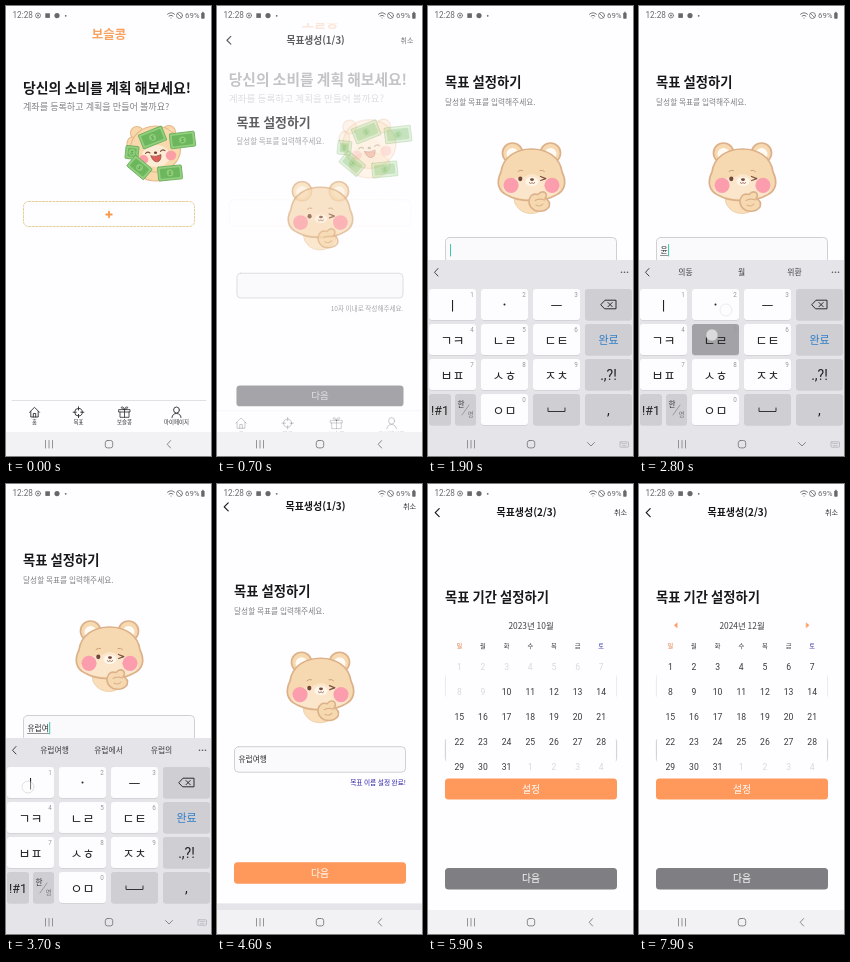
An HTML page with a canvas for the animation above (8 s loop, 205 px wide and 450 px high).

```html
<!DOCTYPE html>
<html lang="ko">
<head>
<meta charset="utf-8">
<style>
html, body { margin: 0; width: 100%; height: 100%; overflow: hidden; background: #fefdff; }
canvas { display: block; width: 205px; height: 450px; }
</style>
</head>
<body>
<canvas id="stage"></canvas>
<script>
const W = 205, H = 450, LOOP = 8000;
const KR = '"Noto Sans CJK KR", "Noto Sans CJK JP", "Noto Sans CJK SC", sans-serif';
const LATIN = 'Roboto, "Noto Sans CJK KR", sans-serif';
const BG = '#fefdff', ORANGE = '#ff985b', GRAY = '#7f7e82', INK = '#18181a', MUTED = '#818085';
const canvas = document.getElementById('stage');
const c = canvas.getContext('2d');
const ratio = Math.max(1, window.devicePixelRatio || 1);
canvas.width = W * ratio;
canvas.height = H * ratio;

const clamp = (v, a = 0, b = 1) => Math.min(b, Math.max(a, v));
const span = (t, from, to) => clamp((t - from) / (to - from));
const easeOut = u => 1 - (1 - u) * (1 - u);

// y is the vertical middle of the text
function text(s, x, y, size, color, { align = 'center', weight = 400, font = KR } = {}) {
  c.font = `${weight} ${size}px ${font}`;
  c.textAlign = align;
  c.fillStyle = color;
  c.fillText(s, x, y + size * 0.36);
}

function paint(fill, stroke, width = 1) {
  if (fill) { c.fillStyle = fill; c.fill(); }
  if (stroke) { c.strokeStyle = stroke; c.lineWidth = width; c.stroke(); }
}

function box(x, y, w, h, r, fill, stroke, width) {
  c.beginPath();
  c.roundRect(x, y, w, h, r);
  paint(fill, stroke, width);
}

function oval(x, y, rx, ry, fill, stroke, width) {
  c.beginPath();
  c.ellipse(x, y, rx, ry, 0, 0, Math.PI * 2);
  paint(fill, stroke, width);
}

function path(d, stroke, width = 1, fill) {
  c.lineCap = c.lineJoin = 'round';
  const p = new Path2D(d);
  if (fill) { c.fillStyle = fill; c.fill(p); }
  if (stroke) { c.strokeStyle = stroke; c.lineWidth = width; c.stroke(p); }
}

function layer(draw, { alpha = 1, scale = 1, dx = 0, dy = 0, turn = 0, ox = 0, oy = 0 } = {}) {
  if (alpha <= 0) return;
  c.save();
  c.globalAlpha *= alpha;
  c.translate(ox + dx, oy + dy);
  c.rotate(turn);
  c.scale(scale, scale);
  c.translate(-ox, -oy);
  draw();
  c.restore();
}

function touch(x, y, age, life = 190) {
  if (age < 0 || age > life) return;
  layer(() => oval(x, y, 6, 6, 'rgba(255,255,255,.6)', 'rgba(150,150,155,.55)', 0.7),
    { alpha: 1 - span(age, 60, life) });
}

function statusBar() {
  const ink = '#68686c';
  c.fillStyle = BG;
  c.fillRect(0, 0, W, 17);
  text('12:28', 6.5, 9.5, 8.2, ink, { align: 'left', font: LATIN });
  oval(32, 9.5, 2.5, 2.5, null, ink, 0.8);
  oval(32, 9.5, 0.9, 0.9, ink);
  c.fillStyle = ink;
  c.fillRect(39.3, 7.3, 4.6, 4.6);
  oval(51, 9.6, 2.6, 2.6, ink);
  oval(59.7, 9.8, 0.9, 0.9, ink);
  path('M161.5 8.2Q165 5.2 168.5 8.2M163 10Q165 8.4 167 10M165 12V12.1', ink, 0.9);
  oval(173.5, 9.5, 3, 3, null, ink, 0.8);
  path('M171.5 7.5L175.5 11.5', ink, 0.8);
  text('69%', 179, 9.5, 7.8, ink, { align: 'left', font: LATIN });
  box(195.2, 6.7, 3.4, 6, 0.8, ink);
  c.fillRect(196.1, 5.8, 1.6, 1);
}

function navBar(typing) {
  c.fillStyle = typing ? '#e4e4e9' : '#f2f1f4';
  c.fillRect(0, 426, W, 24);
  const ink = '#7b7b80';
  path('M39.5 434.5V442M43 434.5V442M46.5 434.5V442', ink, 0.8);
  box(99.3, 434.5, 7.4, 7.4, 2.2, null, ink, 0.9);
  path(typing ? 'M159.5 436.5L163 440L166.5 436.5' : 'M164.6 434.6L161.2 438.3L164.6 442', ink, 0.9);
  if (typing) {
    box(192, 435.8, 8.5, 5.4, 0.8, null, '#aaaab0', 0.7);
    path('M193.7 437.6H198.8M194.5 439.6H198', '#aaaab0', 0.6);
  }
}

function button(label, y, color, h = 21.5) {
  box(17, y, 172, h, 3.5, color);
  text(label, 103, y + h / 2, 9.8, '#fff', { weight: 500 });
}

function title(s) {
  text(s, 17, 113, 13.3, INK, { align: 'left', weight: 700 });
}

function header(step) {
  path('M11.2 24.6L7.2 28.6L11.2 32.6', INK, 1.2);
  text(`목표생성(${step}/3)`, 98.5, 28.5, 10, INK, { weight: 700 });
  text('취소', 192.5, 28.5, 7.2, '#333');
}

function bill(x, y, turn, w = 25, h = 15) {
  layer(() => {
    box(-w / 2, -h / 2, w, h, 1, '#93cf7c', '#6cb160', 0.9);
    box(-w / 2 + 2.2, -h / 2 + 2.2, w - 4.4, h - 4.4, 1, '#6cb65e');
    oval(0, 0, 3.4, 3.4, '#8fcd79');
    path('M1 -1.4Q-1.6 -1.6 -.6 -.2Q1.7 .5 .5 1.6L-1.2 1.4', '#4e9a4c', 0.7);
  }, { dx: x, dy: y, turn });
}

function richBear() {
  const edge = '#e6b98a', fur = '#f9d8ac';
  oval(163, 126, 6.5, 6.5, fur, edge, 1.1);
  oval(163, 126.5, 3.6, 3.6, '#fdf0df');
  oval(131, 127, 6.5, 6.5, fur, edge, 1.1);
  oval(150, 163, 19, 12, fur, edge, 1.1);
  oval(126, 138, 5, 7, fur, edge, 1.1);
  oval(149.5, 143, 25, 23, fur, edge, 1.1);
  oval(150, 150, 14, 11, '#fdebd3');
  oval(137.5, 153.5, 4.8, 4.4, '#fb9ea6');
  oval(165, 149.5, 5.2, 4.8, '#fb9ea6');
  path('M139.5 147.5Q141.5 145 144 147M154.5 145.3Q156.6 142.8 159 144.6', '#7d5040', 1.1);
  oval(149.5, 146.7, 1.6, 1.2, '#70423a');
  path('M145 150Q150 151.4 155 148.6Q155.3 155.2 151.3 155.8Q147 156 145 150Z', '#8a4a3e', 0.7, '#dd5f5a');
  bill(146.5, 131.5, -0.38);
  bill(176.5, 134, -0.12);
  bill(126, 146.5, 0.1, 13, 13);
  bill(133.5, 161.5, 0.7, 22, 14);
  bill(164, 167, -0.1, 24, 14);
}

function winkBear() {
  const edge = '#dcb189', fur = '#f7d9b1';
  for (const x of [84.5, 122.5]) {
    oval(x, 184, 10, 10, fur, edge, 1.7);
    oval(x, 185, 6, 6, '#fffaf3');
  }
  oval(103, 229, 17, 15.5, '#f9deb9', '#efd0a9', 0.9);
  path('M73 203C75 188 88 180 103.5 180C119 180 132 188 134 203C139 213 137 222 128 226Q118 232 103.5 231.5Q89 232 79 226C70 222 68 213 73 203Z', edge, 1.7, fur);
  path('M79 225C72 221 74 211 84 209Q93 210 98 207Q104 203 110 207Q115 210 123 209C133 211 135 221 128 225Q117 230.5 103.5 230Q90 230.5 79 225Z', null, 1, '#fbe6cb');
  oval(83, 216.3, 7.6, 7.6, '#fb9dac');
  oval(124, 216.3, 7.6, 7.6, '#fb9dac');
  oval(104, 212.5, 6.5, 4.6, '#fff6ea');
  oval(92.3, 209.8, 2.1, 2.4, '#70453a');
  path('M112.5 207.5L117.8 209.6L112.7 211.5', '#7d5040', 1.3);
  path('M90 202.5Q92 200.5 94.5 201.5M112 201.5Q115 200.5 116.5 202.5', '#cfa077', 1);
  oval(104, 210.6, 2, 1.4, '#70453a');
  path('M101.2 213.6Q102.6 215.5 104 213.6Q105.4 215.5 106.8 213.6', '#8a584b', 0.8);
  path('M101 231Q103 223.5 110 225.5Q114 221 117.5 224Q119.5 226.5 117 229.5Q123 232 121 238Q116 244 107 241.5Q100.5 238 101 231Z', edge, 1.6, fur);
  path('M107 231.5Q112 229 116.5 231M108 236Q112 238.5 115 235', edge, 1.1);
}

function tabBar() {
  const ink = '#2c2c2f';
  path('M6 394.5H200', '#d6d5d9', 0.7);
  path('M23.5 406.3L28.5 401.3L33.5 406.3M24.8 405.5V411H32.2V405.5M27.3 411V407.5H29.7V411', ink, 0.9);
  oval(72.5, 406.2, 3.8, 3.8, null, ink, 0.9);
  path('M72.5 400.8V404M72.5 408.4V411.6M67.1 406.2H70.3M74.7 406.2H77.9', ink, 0.9);
  path('M113 403.6H124V406H113ZM114 406V411.3H123V406M118.5 403.6V411.3M118.5 403.6Q113.5 402 116 400.8Q118 401 118.5 403.6Q119 401 121 400.8Q123.5 402 118.5 403.6', ink, 0.8);
  oval(170.5, 404, 2.9, 3, null, ink, 0.9);
  path('M166 411.5Q166.5 407.5 170.5 407.5Q174.5 407.5 175 411.5', ink, 0.9);
  ['홈', '목표', '보슬콩', '마이페이지'].forEach((s, i) =>
    text(s, [28.5, 72.5, 118.5, 170.5][i], 416.5, 5.4, ink));
}

function home(t) {
  text('보슬콩', 103, 28.5, 12.5, '#f8a25f', { weight: 900 });
  text('당신의 소비를 계획 해보세요!', 17, 82, 13.9, INK, { align: 'left', weight: 700 });
  text('계좌를 등록하고 계획을 만들어 볼까요?', 17, 100.5, 9.1, MUTED, { align: 'left' });
  richBear();
  layer(() => {
    c.setLineDash([2, 1.5]);
    box(17.5, 195.5, 171, 25, 5, null, '#e6cf92', 1);
    c.setLineDash([]);
    path('M100.2 208.5H105.8M103 205.7V211.3', '#f59a4c', 1.8);
  }, { alpha: 1 - 0.6 * span(t, 60, 240) });
  tabBar();
}

// One entry per keystroke
const strokes = 'ㅇㅡㆍㆍㄴㄴㆍㅣㅂㅇㆍㆍㅣㅅㅅㅣㆍㅣㅇ';
const typed = ('ㅇ 으 우 유 윤 율 율ㆍ 유러 유럽 유럽ㅇ 유럽ㅇㆍ 유럽ㅇᆢ 유럽여 유럽엿 유럽옇 ' +
  '유럽여히 유럽여하 유럽여해 유럽여행').split(' ');
const TYPE_START = 2354, TYPE_STEP = 104;
const strokeAt = t => Math.min(strokes.length - 1, Math.floor((t - TYPE_START) / TYPE_STEP));
const touchSpots = { 'ㅣ': [22, 303], 'ㆍ': [87, 304], 'ㅡ': [130, 300], 'ㄴ': [73, 329], 'ㅂ': [25, 367], 'ㅅ': [78, 366], 'ㅇ': [76, 401] };

const keyboardUp = t => easeOut(span(t, 1350, 1650)) * (1 - easeOut(span(t, 4480, 4680)));

function goalName(t) {
  const up = keyboardUp(t), n = strokeAt(t), name = n < 0 ? '' : typed[n];
  const focused = t > 1150 && t < 4480;
  layer(() => {
    header(1);
    title('목표 설정하기');
    text('달성할 목표를 입력해주세요.', 17, 133, 7.7, MUTED, { align: 'left' });
    winkBear();
    box(17.5, 268.5, 171, 25.5, 4, '#faf9fc', '#cbcace', 0.9);
    text(name, 21.5, 281.5, 7.7, '#2c2c2e', { align: 'left' });
    const end = 22 + c.measureText(name).width;
    if (focused) {
      if (name) path(`M21.5 286.5H${end - 0.5}`, '#555', 0.6);
      path(`M${end + 0.5} 275.5V287`, '#39c9a5', 1);
    }
    if (name) text('목표 이름 설정 완료!', 189, 304.5, 6.7, '#2b22a8', { align: 'right' });
    else text('10자 이내로 작성해주세요.', 189, 304.5, 6.8, MUTED, { align: 'right' });
    if (up < 0.5) button('다음', 384, name ? ORANGE : GRAY);
  }, { dy: -37 * up });
}

function key(x, y, w, label, { tone = '#fdfcfe', size = 13, digit, font = KR, color = '#222', weight = 400, down } = {}) {
  box(x, y + 0.8, w, 31, 3, '#cfcfd4');
  box(x, y, w, 31, 3, down ? '#a3a2a7' : tone);
  if (label === 'ㆍ') oval(x + w / 2, y + 15.5, 1, 1, color);
  else text(label, x + w / 2, y + 16, size, color, { font, weight });
  if (digit !== undefined) text(digit, x + w - 4, y + 6, 6.3, '#9a9a9f', { font: LATIN });
}

function keyboard(t) {
  const n = strokeAt(t), age = t - TYPE_START - n * TYPE_STEP;
  const active = n >= 0 && age < 90 ? strokes[n] : '';
  const dark = '#cfced3', rows = [283, 318, 353, 388], cols = [1, 53, 105, 157];
  c.fillStyle = '#e4e4e9';
  c.fillRect(0, 254, W, 196);
  path('M10 262.5L6.5 266.3L10 270', '#444', 1);
  for (const x of [193.5, 196.5, 199.5]) oval(x, 266.3, 0.8, 0.8, '#555');
  const hints = n < 0 ? [] : n < 7 ? ['의동', '월', '위환'] : ['유럽여행', '유럽에서', '유럽의'];
  hints.forEach((s, i) => text(s, [46.5, 102.5, 155.5][i] + (n >= 7 && !i ? 2 : 0), 266.3, 7.8, '#3c3c40'));

  ['ㅣ', 'ㆍ', 'ㅡ', 'ㄱㅋ', 'ㄴㄹ', 'ㄷㅌ', 'ㅂㅍ', 'ㅅㅎ', 'ㅈㅊ'].forEach((s, i) =>
    key(cols[i % 3], rows[Math.floor(i / 3)], 47, s, { digit: i + 1, weight: 500, down: s[0] === active }));
  key(53, 388, 47, 'ㅇㅁ', { digit: 0, weight: 500, down: active === 'ㅇ' });
  key(1, 388, 22, '!#1', { tone: dark, size: 12.5, font: LATIN });
  key(27, 388, 21, '', { tone: dark });
  text('한', 33, 398.5, 7.6, '#333');
  text('영', 42.5, 409, 6.6, '#777');
  path('M34 409L41 399', '#777', 0.6);
  key(105, 388, 47, '', { tone: dark });
  path('M120 402V405.5H137V402', '#333', 1);
  key(157, 283, 47, '', { tone: dark });
  path('M173 298.5L177 294.2H188V302.8H177ZM180 296.5L184.2 300.7M184.2 296.5L180 300.7', '#2c2c2f', 1);
  key(157, 318, 47, '완료', { tone: dark, size: 11, color: '#2f7fc7', down: t > 4430 && t < 4500 });
  key(157, 353, 47, '.,?!', { tone: dark, size: 14, font: LATIN });
  key(157, 388, 47, ',', { tone: dark, size: 14, font: LATIN });

  for (let i = Math.max(0, n - 2); i <= n; i++) {
    if (strokes[i] === strokes[i + 1] && i < n) continue;
    touch(...touchSpots[strokes[i]], t - TYPE_START - i * TYPE_STEP);
  }
  touch(181, 333, t - 4430);
}

function calendar(t) {
  const month = clamp(Math.floor((t - 6100) / 100), 0, 14);
  const first = new Date(2023, 9 + month, 1);
  const year = first.getFullYear(), m = first.getMonth();
  const length = new Date(year, m + 1, 0).getDate();
  const lead = first.getDay(), total = Math.ceil((lead + length) / 7) * 7;
  const colX = i => 31.3 + 23.65 * i;
  c.fillStyle = BG;
  c.fillRect(18.2, 128, 169.6, 168);
  text(`${year}년 ${m + 1}월`, 103, 141.5, 8.4, '#3c3c40');
  if (t >= 6000) {
    path('M38 139L35.3 141.3L38 143.6Z', ORANGE, 0.5, ORANGE);
    path('M167.4 139L170.1 141.3L167.4 143.6Z', ORANGE, 0.5, ORANGE);
  }
  [...'일월화수목금토'].forEach((d, i) =>
    text(d, colX(i), 162, 6.2, i === 0 ? '#e07336' : i === 6 ? '#2d2ca6' : '#333', { weight: 500 }));
  for (let i = 0; i < total; i++) {
    const date = new Date(year, m, i - lead + 1), day = date.getDate();
    const off = date.getMonth() !== m || (month === 0 && day < 10);
    text(day, colX(i % 7), 183.2 + 24.9 * Math.floor(i / 7), 8.6, off ? '#d9d8dc' : '#38383b', { font: LATIN });
  }
  c.fillStyle = BG;
  c.fillRect(17, 294, 173, 24);
  button('설정', 294.5, ORANGE, 21);
  if (t >= 6180 && t < 7600) touch(169, 142, (t - 6180) % 100);
}

function goalPeriod(t) {
  header(2);
  title('목표 기간 설정하기');
  const field = y => box(17.4, y, 171.2, 25, 4, '#faf9fc', '#cbcace', 0.9);
  layer(() => field(189.5), { alpha: 1 - 0.6 * span(t, 5560, 5740) });
  field(253.5);
  button('다음', 384, GRAY);
  if (t >= 5900) calendar(t);
}

// Old screen grows and fades, the next one zooms in from the centre
function zoomTo(prev, next, p) {
  const mid = { ox: 102.5, oy: 225 };
  if (p < 1) layer(prev, { ...mid, scale: 1 + 0.075 * p, alpha: 1 - span(p, 0.24, 1) });
  if (p > 0) layer(next, { ...mid, scale: 0.85 + 0.15 * p, alpha: span(p, 0.6, 0.9) });
}

function draw(t) {
  c.setTransform(ratio, 0, 0, ratio, 0, 0);
  c.fillStyle = BG;
  c.fillRect(0, 0, W, H);
  if (t < 1100) zoomTo(() => home(t), () => goalName(t), easeOut(span(t, 420, 920)));
  else zoomTo(() => goalName(t), () => goalPeriod(t), easeOut(span(t, 4850, 5250)));
  touch(90, 281, t - 1060);
  statusBar();
  const up = keyboardUp(t);
  if (up > 0) layer(() => keyboard(t), { dy: 196 * (1 - up) });
  navBar(up > 0.3);
}

function tick(now) {
  draw(now % LOOP);
  requestAnimationFrame(tick);
}
requestAnimationFrame(tick);
</script>
</body>
</html>
```
